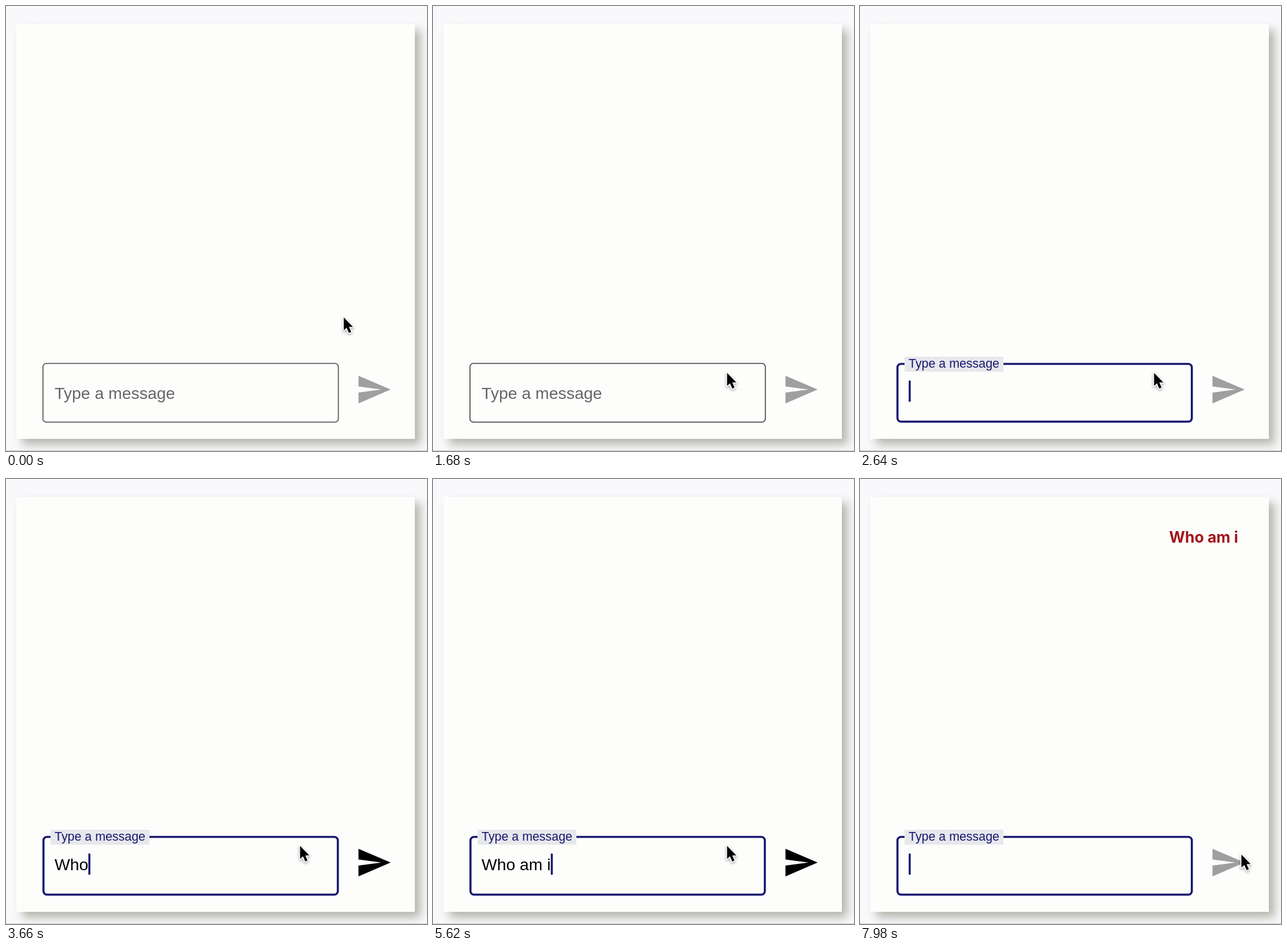
Recreate the animation shown at these times as an HTML page with a canvas. Size 728 by 769 pixels, loop 8000 ms.

```html
<!DOCTYPE html>
<html lang="en">
<head>
<meta charset="utf-8">
<title>Chat box</title>
<style>
  html, body { margin: 0; width: 100%; height: 100%; overflow: hidden; background: #f9f9fb; }
  canvas { display: block; width: 728px; height: 769px; }
</style>
</head>
<body>
<canvas id="stage" width="728" height="769"></canvas>
<script>
const ctx = document.getElementById('stage').getContext('2d');
const LOOP = 8000;
const FOCUS = 1832;
const SENT = 7300;
const NAVY = '#191970';
const CARD = '#fdfefc';
const SANS = '"Liberation Sans", Arial, sans-serif';
const MESSAGE = 'Who am i';
const KEY_TIMES = [2960, 3180, 3440, 3800, 4100, 4620, 5000, 5460];
const SEND_ICON = new Path2D('M2.01 21L23 12 2.01 3 2 10l15 2-15 2z');
const ARROW = new Path2D('M0 0V22.5L5 18L9 27L13 25.3L9 16.5H16Z');

const clamp = v => Math.max(0, Math.min(1, v));
const phase = (t, start, length) => clamp((t - start) / length);
const mix = (a, b, p) => a + (b - a) * p;
const smooth = p => p * p * (3 - 2 * p);
const easeOut = (p, power) => 1 - Math.pow(1 - p, power);

function text(str, x, y, font, color, alpha = 1) {
  ctx.globalAlpha = alpha;
  ctx.font = font;
  ctx.fillStyle = color;
  ctx.fillText(str, x, y);
  ctx.globalAlpha = 1;
}

function drawCard() {
  ctx.fillStyle = '#f9f9fb';
  ctx.fillRect(0, 0, 728, 769);
  ctx.save();
  ctx.shadowColor = '#b6b7ae';
  ctx.shadowBlur = 15;
  ctx.shadowOffsetX = ctx.shadowOffsetY = 10;
  ctx.fillStyle = CARD;
  ctx.fillRect(18, 31, 689, 717);
  ctx.restore();
  ctx.fillStyle = '#c9c9c9';
  ctx.fillRect(0, 768, 728, 1);
}

// The notch widens from its centre while the label rises into it.
function drawField(t) {
  const focused = t >= FOCUS;
  const p = smooth(phase(t, FOCUS, 150));
  const notch = 171 * p;
  const left = 162.5 - notch / 2;

  ctx.fillStyle = '#e7e8ec';
  ctx.fillRect(left, 606, notch, 26 * p ** 3);

  const font = mix(28.4, 21.4, p) + 'px ' + SANS;
  const base = mix(679, 625, p);
  if (p < 1) text('Type a message', 84, base, font, '#666', 1 - p);
  if (p > 0) text('Type a message', 84, base, font, NAVY, p);

  const line = focused ? 3.6 : 1.8;
  ctx.save();
  ctx.beginPath();
  ctx.rect(0, 600, 728, 140);
  ctx.rect(left, 600, notch, 40);
  ctx.clip('evenodd');
  ctx.beginPath();
  ctx.roundRect(63 + line / 2, 616.7 + line / 2, 512.6 - line, 103.4 - line, 6);
  ctx.lineWidth = line;
  ctx.strokeStyle = focused ? NAVY : t >= 700 ? '#505050' : '#5c5c5c';
  ctx.stroke();
  ctx.restore();
}

function drawInput(t) {
  if (t < FOCUS) return;
  const count = t < SENT ? KEY_TIMES.filter(k => k <= t).length : 0;
  const typed = MESSAGE.slice(0, count);
  text(typed, 84, 676, '28.3px ' + SANS, '#000');
  ctx.fillStyle = NAVY;
  ctx.beginPath();
  ctx.roundRect(84.2 + ctx.measureText(typed).width, 647, 3.5, 37, 1.5);
  ctx.fill();
}

function drawSend(t) {
  const active = t >= KEY_TIMES[0] && t < SENT;
  ctx.save();
  ctx.translate(604.2, 631);
  ctx.scale(2.65, 2.65);
  ctx.fillStyle = active ? '#000' : '#9f9f9f';
  ctx.fill(SEND_ICON);
  ctx.restore();
}

function drawMessage(t) {
  if (t < SENT) return;
  ctx.textAlign = 'right';
  text(MESSAGE, 654, 110, '700 26.5px Inter, sans-serif', '#a31318');
  ctx.textAlign = 'left';
}

function drawPointer(t) {
  const enter = phase(t, 280, 740);
  const cross = smooth(phase(t, 6550, 300));
  let x = mix(584, 508.5, easeOut(enter, 2.1));
  let y = mix(538, 634, easeOut(enter, 1.85));
  x = mix(x, 657.5, cross) + 2 * phase(t, 7160, 100);
  y = mix(y, 649, cross);
  ctx.save();
  ctx.translate(x, y);
  ctx.lineJoin = 'round';
  ctx.lineWidth = 3.4;
  ctx.strokeStyle = '#fff';
  ctx.shadowColor = 'rgba(0,0,0,.35)';
  ctx.shadowBlur = 4;
  ctx.shadowOffsetY = 2;
  ctx.stroke(ARROW);
  ctx.shadowColor = 'transparent';
  ctx.fillStyle = '#000';
  ctx.fill(ARROW);
  ctx.restore();
}

function frame(now) {
  const t = now % LOOP;
  drawCard();
  drawMessage(t);
  drawField(t);
  drawInput(t);
  drawSend(t);
  drawPointer(t);
  requestAnimationFrame(frame);
}
frame(0);
</script>
</body>
</html>
```
